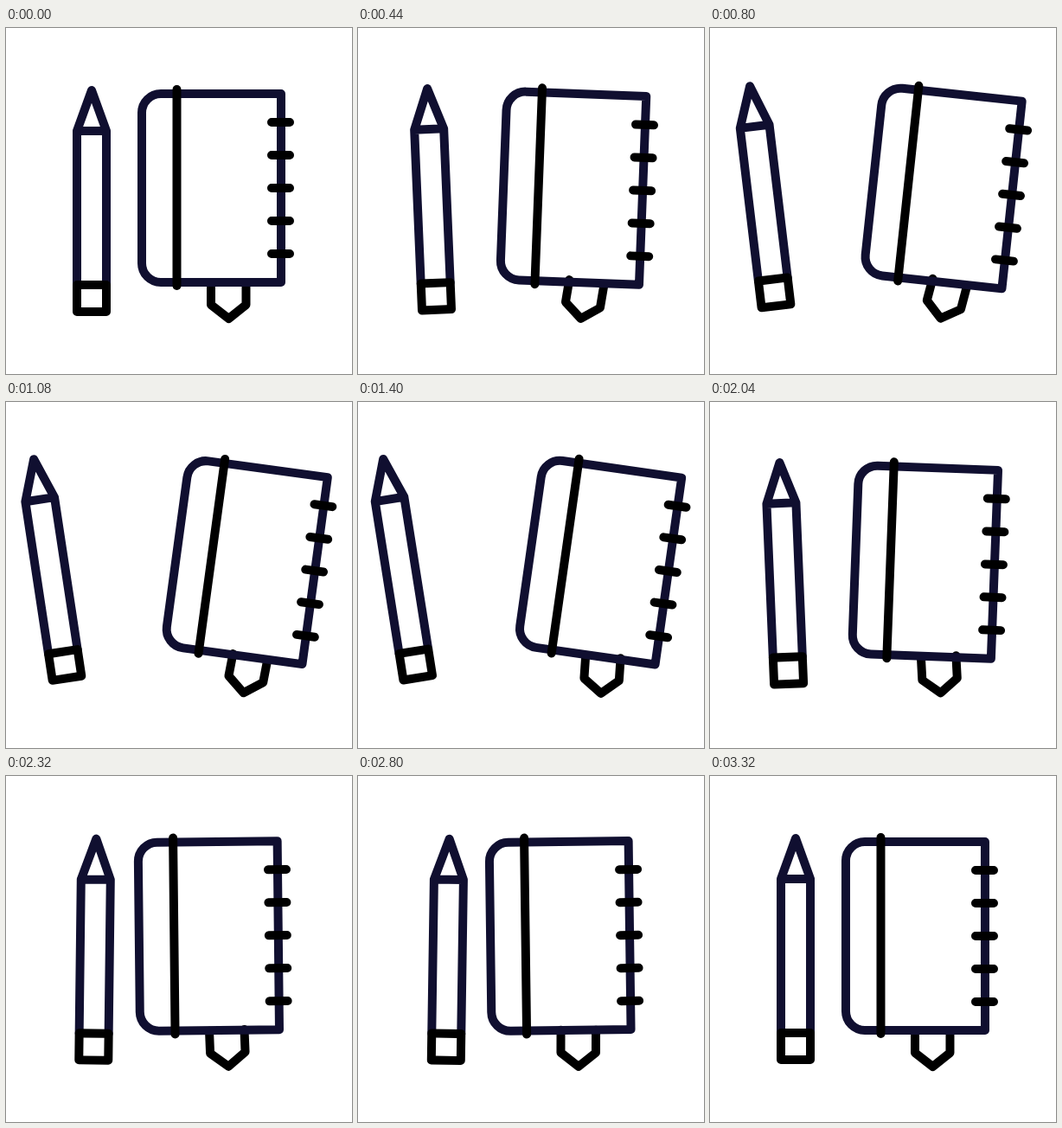
An HTML page that plays this animation: 400 by 400 pixels, repeating every 3400 ms.

```html
<!DOCTYPE html>
<html lang="en">
<head>
<meta charset="utf-8">
<title>Pencil and notebook</title>
<style>
  html, body { margin: 0; width: 100%; height: 100%; overflow: hidden; background: #fff; }
  svg { display: block; width: 100vw; height: 100vh; }
  path { fill: none; stroke: #000; stroke-width: 10; stroke-linecap: round; stroke-linejoin: round; }
  .navy { stroke: #100f30; }
</style>
</head>
<body>
<svg viewBox="0 0 400 400">
  <g id="pencil">
    <path class="navy" d="M82 297V119L99 72L116 119V297M82 119H116"/>
    <path d="M82 297H116V328H82Z"/>
  </g>
  <g id="book">
    <path id="ribbon" d="M237 294V320L257.5 336L277.5 320V294"/>
    <path class="navy" d="M318 76H179a22 22 0 0 0-22 22V272a22 22 0 0 0 22 22H318Z"/>
    <path d="M197.500 71V298"/>
    <path d="M307 109h21M307 147h21M307 185h21M307 223h21M307 261h21"/>
  </g>
</svg>
<script>
  const LOOP = 3400;
  const TICKS = [200, 120, 80, 0];

  // Each key: time, value, and the easing [x1, x2] leading to it.
  const swing = [
    [80, 0],
    [1320, 1.015, [0.333, 0.45]],
    [2560, -0.13, [0.66, 0.4]],
    [3360, 0, [0.333, 0.5]]
  ];
  const sway = [
    [80, 0],
    [620, 10, [0.333, 0.667]],
    [1700, -7.5, [0.333, 0.667]],
    [2700, 1, [0.333, 0.667]],
    [3360, 0, [0.333, 0.667]]
  ];

  // Cubic bezier with flat ends, solved by bisection.
  function ease(x, [x1, x2]) {
    let lo = 0, hi = 1, s = 0.5;
    for (let i = 0; i < 24; i++) {
      s = (lo + hi) / 2;
      const r = 1 - s;
      if (3 * r * r * s * x1 + 3 * r * s * s * x2 + s * s * s < x) lo = s;
      else hi = s;
    }
    return s * s * (3 - 2 * s);
  }

  function valueAt(keys, t) {
    if (t <= keys[0][0]) return keys[0][1];
    const i = keys.findIndex(k => k[0] > t);
    if (i < 0) return keys[keys.length - 1][1];
    const [t0, v0] = keys[i - 1];
    const [t1, v1, curve] = keys[i];
    return v0 + (v1 - v0) * ease((t - t0) / (t1 - t0), curve);
  }

  // The picture holds for 80, 40, 80 and 80 ms in turn.
  function hold(t) {
    if (t < 160) return 0;
    const part = (t - 160) % 280;
    return t - part + TICKS.find(k => k <= part);
  }

  const parts = ["pencil", "book", "ribbon"].map(id => document.getElementById(id));

  function place(el, dx, dy, angle, cx, cy) {
    el.setAttribute("transform", `translate(${dx} ${dy}) rotate(${angle} ${cx} ${cy})`);
  }

  function draw(now) {
    const t = hold(now % LOOP);
    const p = valueAt(swing, t);
    const [pencil, book, ribbon] = parts;
    place(pencil, -49.25 * p, -7.5 * p, -8.9 * p, 99, 200);
    place(book, 41 * p, 2 * p, 8 * p, 257.5, 185);
    place(ribbon, 0, 0, valueAt(sway, t), 257, 294);
  }

  const start = performance.now();
  function frame() {
    draw(performance.now() - start);
    requestAnimationFrame(frame);
  }
  frame();
</script>
</body>
</html>
```
